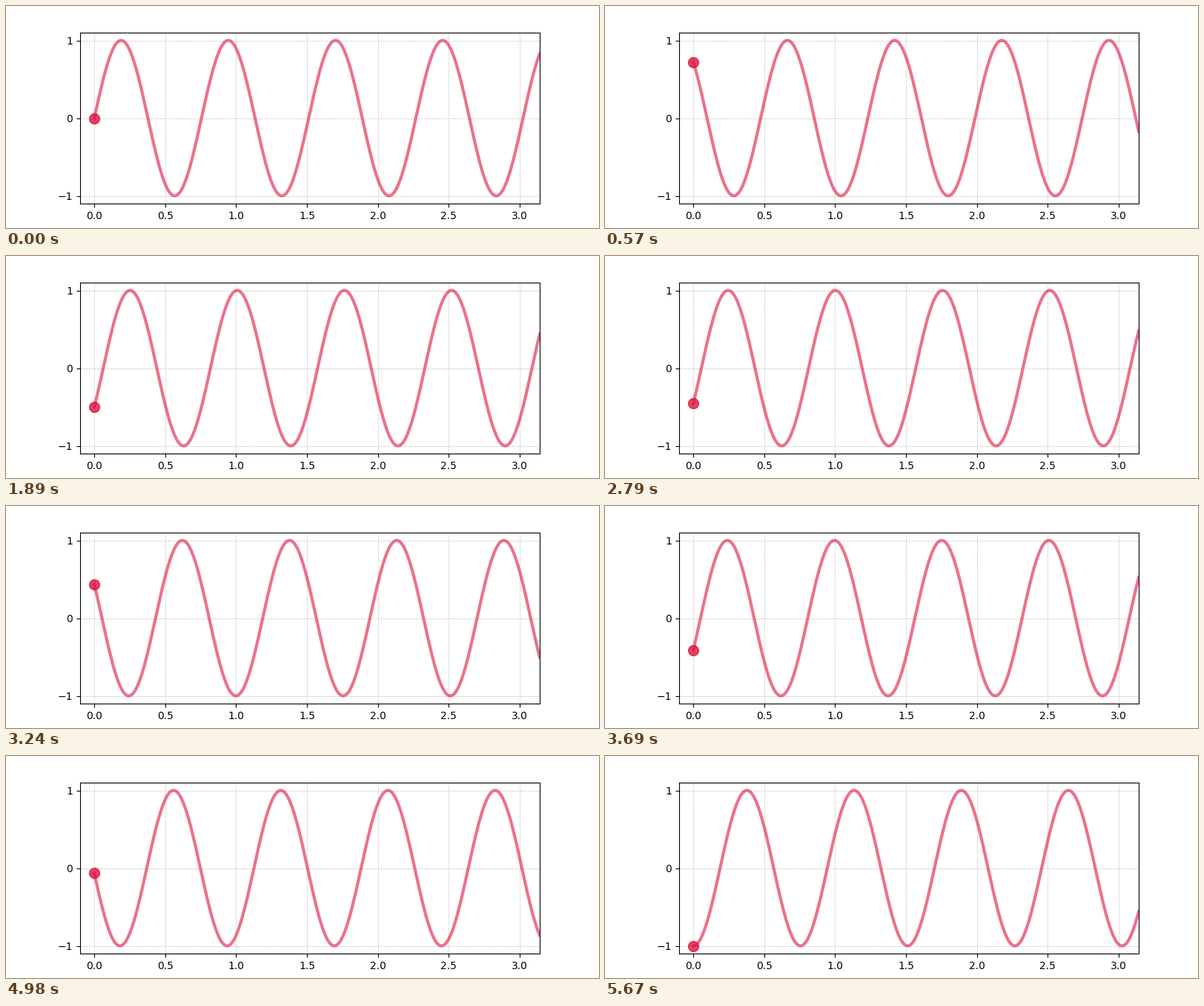
A matplotlib script that plays this animation: 800x300 px, repeating every 5700 ms.

```python
import numpy as np
import matplotlib.pyplot as plt
from matplotlib.animation import FuncAnimation

FRAMES = 190
INTERVAL = 30
WAVELENGTH = 0.756
K = 2 * np.pi / WAVELENGTH
STEP = 0.025  # distance travelled per frame

fig, ax = plt.subplots(figsize=(8, 3), dpi=100)
ax.set_xlim(-0.1, np.pi)
ax.set_ylim(-1.1, 1.1)
ax.set_yticks([-1, 0, 1])
ax.grid(linestyle="--", linewidth=0.5, alpha=0.8)

x = np.linspace(0, np.pi, 500)
wave, = ax.plot([], [], color="crimson", lw=3, alpha=0.6)
dot, = ax.plot([], [], "o", color="crimson", ms=10, alpha=0.8)


def update(i):
    y = np.sin(K * (x - STEP * i))
    wave.set_data(x, y)
    dot.set_data(x[:1], y[:1])
    return wave, dot


anim = FuncAnimation(fig, update, frames=FRAMES, interval=INTERVAL,
                     repeat=True, repeat_delay=0)
plt.show()
```
